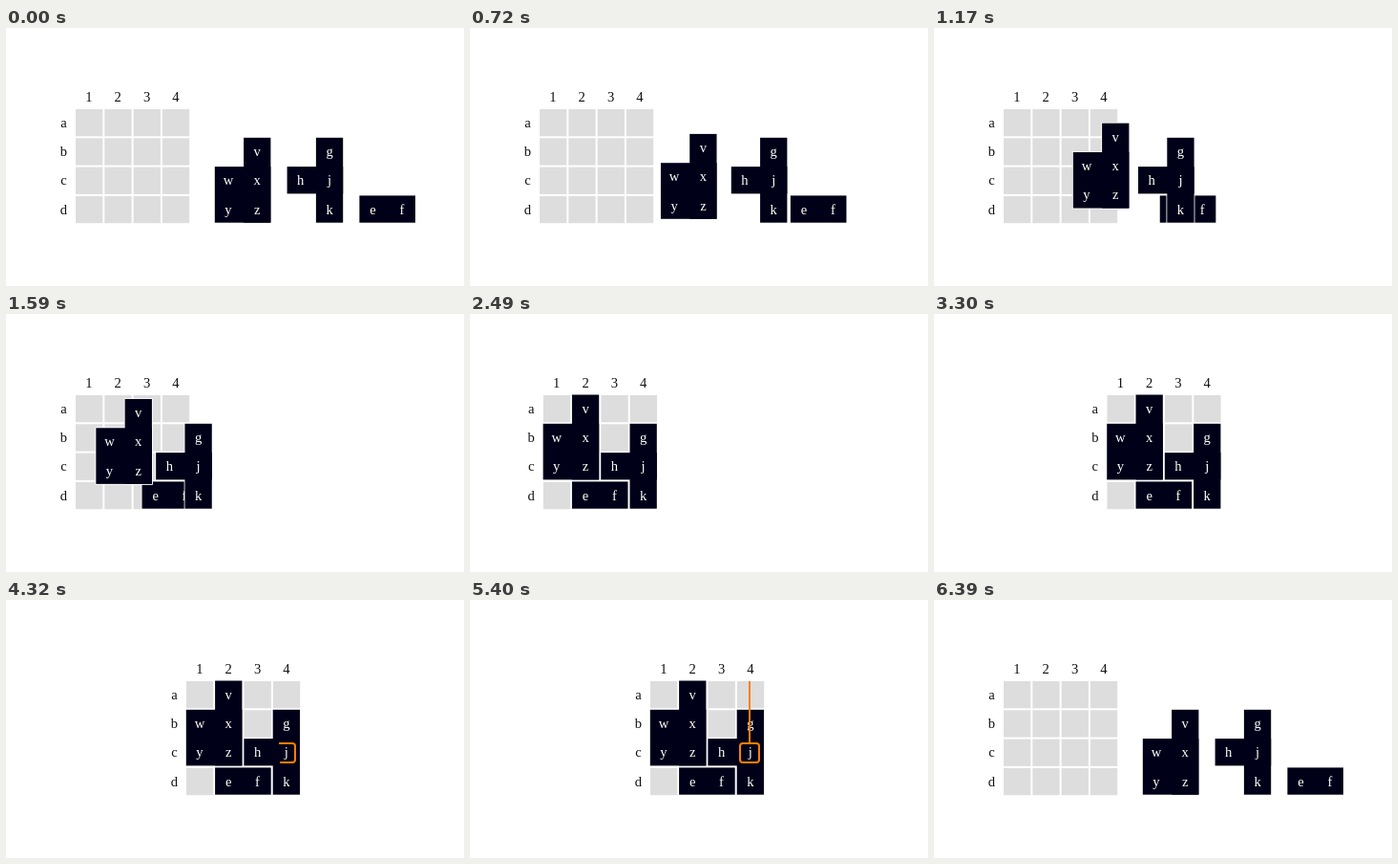
Write an HTML page with a canvas that moves like this. It is 480 px wide and 270 px high and loops after 6420 ms.

```html
<!DOCTYPE html>
<html lang="en">
<head>
<meta charset="utf-8">
<title>Fitting blocks into a grid</title>
<style>
  html, body { margin: 0; width: 100%; height: 100%; overflow: hidden; background: #fff; }
  canvas { display: block; }
</style>
</head>
<body>
<canvas id="stage" width="480" height="270"></canvas>
<script>
const ctx = document.getElementById("stage").getContext("2d");

const STEP = 30, STEPS = 214;          // ms per step, steps per loop
const PITCH = 30.3, CELL = 28.3;
const GRID_X = 73, GRID_Y = 85, CENTER_SHIFT = 116;
const PIECE_X = 72.8, PIECE_Y = 84.5;  // grid corner as the pieces see it
const DARK = "#000018", GRAY = "#ddd", ORANGE = "#ff7f00";

// rects: [col, row, width, height] in cells; from: [x, row]; to: [col, row]
const pieces = [
  { from: [370.4, 3], to: [1, 3],
    rects: [[0, 0, 2, 1]],
    letters: [["e", 0, 0], ["f", 1, 0]] },
  { from: [294.6, 1], to: [2, 1],
    rects: [[1, 0, 1, 3], [0, 1, 2, 1]],
    letters: [["g", 1, 0], ["h", 0, 1], ["j", 1, 1], ["k", 1, 2]] },
  { from: [218.8, 1], to: [0, 0],
    rects: [[1, 0, 1, 3], [0, 1, 2, 2]],
    letters: [["v", 1, 0], ["w", 0, 1], ["x", 1, 1], ["y", 0, 2], ["z", 1, 2]] }
];

const lerp = (a, b, p) => a + (b - a) * p;
const curve = (s, a, b) => 3 * (1 - s) * (1 - s) * s * a + 3 * (1 - s) * s * s * b + s * s * s;

// cubic-bezier(.42, 0, .58, 1)
function easeInOut(t) {
  if (t <= 0) return 0;
  if (t >= 1) return 1;
  let lo = 0, hi = 1;
  for (let i = 0; i < 24; i++) {
    const mid = (lo + hi) / 2;
    if (curve(mid, 0.42, 0.58) < t) lo = mid; else hi = mid;
  }
  return curve(lo, 0, 1);
}

const progress = (step, start, length) => easeInOut((step - start) / length);

function text(str, x, y, color) {
  ctx.fillStyle = color;
  ctx.fillText(str, x, y);
}

function drawGrid(x0) {
  for (let i = 0; i < 4; i++) {
    const mid = i * PITCH + CELL / 2;
    text("1234"[i], x0 + mid - 0.2, 76.5, "#111");
    text("abcd"[i], x0 - 12.6, GRID_Y + mid + 4.6, "#111");
    ctx.fillStyle = GRAY;
    for (let j = 0; j < 4; j++) {
      ctx.fillRect(x0 + i * PITCH, GRID_Y + j * PITCH, CELL, CELL);
    }
  }
}

function fillRects(rects, x, y, grow, color) {
  ctx.fillStyle = color;
  for (const [c, r, w, h] of rects) {
    ctx.fillRect(x + c * PITCH - grow, y + r * PITCH - grow,
      (w - 1) * PITCH + CELL + 2 * grow, (h - 1) * PITCH + CELL + 2 * grow);
  }
}

function drawPiece({ from, to, rects, letters }, move, shift) {
  const x = lerp(from[0], PIECE_X + to[0] * PITCH, move) + shift;
  const y = PIECE_Y + lerp(from[1], to[1], move) * PITCH;
  fillRects(rects, x, y, 0.8, "#fff");
  fillRects(rects, x, y, 0, DARK);
  for (const [ch, c, r] of letters) {
    text(ch, x + c * PITCH + CELL / 2, y + r * PITCH + CELL / 2 + 5, "#fff");
  }
}

function drawFrame(p) {
  if (p <= 0) return;
  const side = 20, r = 3;
  const length = 4 * side - 8 * r + 2 * Math.PI * r;
  ctx.setLineDash(p < 1 ? [p * length, length] : []);
  ctx.beginPath();
  ctx.roundRect(283, 150, side, side, r);
  ctx.stroke();
  ctx.setLineDash([]);
}

function drawLine(x1, y1, x2, y2, p) {
  if (p <= 0) return;
  ctx.beginPath();
  ctx.moveTo(x1, y1);
  ctx.lineTo(lerp(x1, x2, p), lerp(y1, y2, p));
  ctx.stroke();
}

function draw(step) {
  ctx.fillStyle = "#fff";
  ctx.fillRect(0, 0, 480, 270);
  ctx.font = "14.6px 'Liberation Serif', serif";
  ctx.textAlign = "center";

  const move = progress(step, 9, 60);
  const shift = CENTER_SHIFT * progress(step, 78, 39);
  drawGrid(GRID_X + shift);
  for (const piece of pieces) drawPiece(piece, move, shift);

  ctx.strokeStyle = ORANGE;
  ctx.lineWidth = 2;
  drawFrame(progress(step, 126, 30));
  drawLine(293, 149, 293, 85, progress(step, 165, 15));
  drawLine(282, 160, 189, 160, progress(step, 189, 15));
}

const begin = performance.now();
function tick() {
  const elapsed = Math.max(0, performance.now() - begin);
  const step = Math.floor(elapsed / STEP) % STEPS;
  draw(step % (STEPS - 1));            // the last step shows the start again
  requestAnimationFrame(tick);
}
tick();
</script>
</body>
</html>
```
